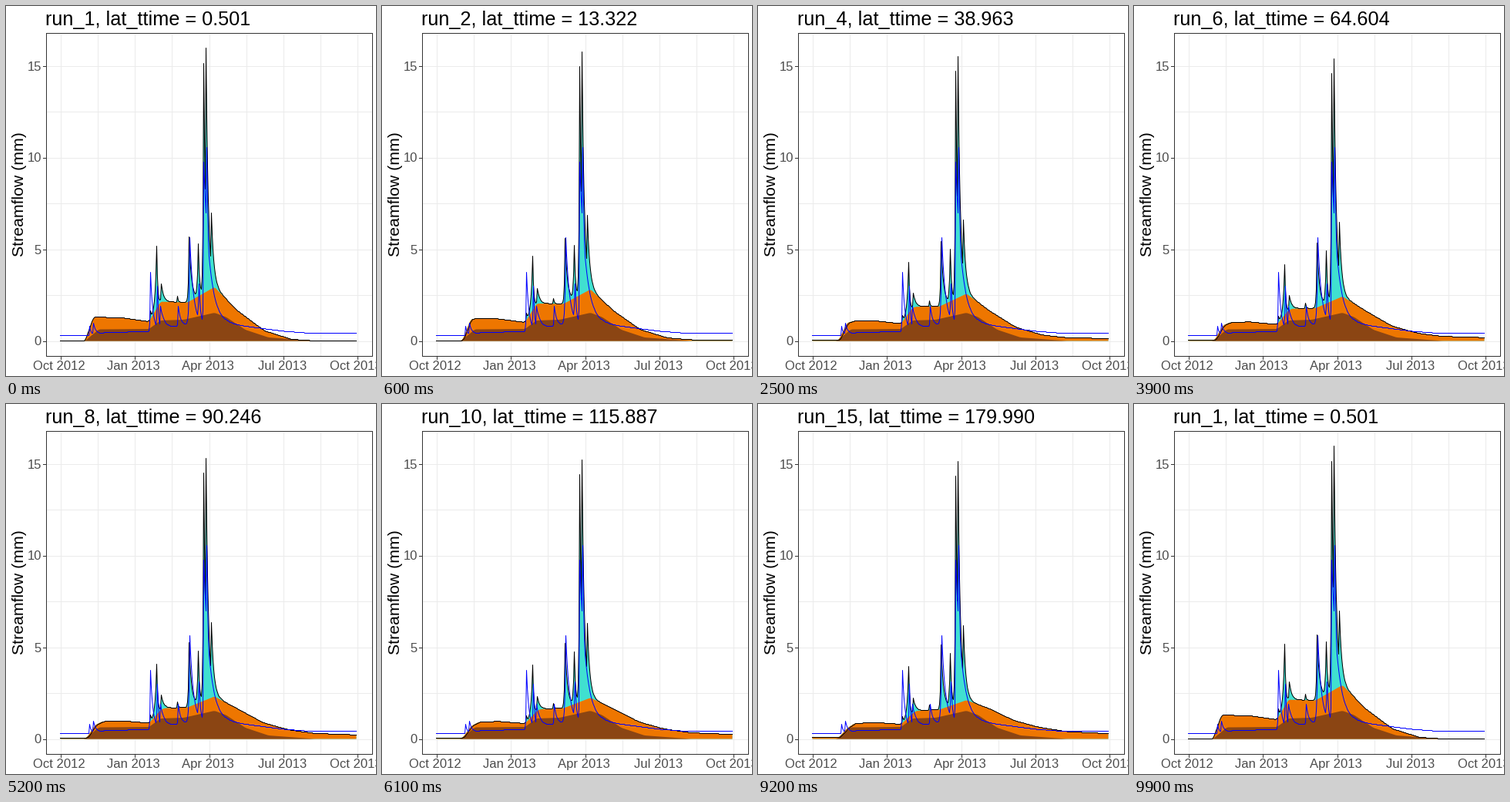
These frames come from a looping animation (480x480 px, 10 s). A matplotlib script:

```python
import numpy as np
import matplotlib.pyplot as plt
from matplotlib.animation import FuncAnimation

SIZE, DPI = 480, 100
PX = 72 / DPI
ZERO, UNIT = 434.5, 23.83          # pixel row of zero, pixels per mm
LEFT, RIGHT, TOP, BOTTOM = 51.5, 474.5, 34.5, 453.5
GRID, DARK, GREY = "#EBEBEB", "#333333", "#4D4D4D"
RUNS = 15
LAT_TIMES = np.linspace(0.501, 179.99, RUNS)
HOLDS = [7] * 6 + [6] + [7] * 3 + [6] * 4
STARTS = np.cumsum([4] + HOLDS)    # frame at which each change begins

plt.rcParams["font.family"] = "Liberation Sans"
plt.rcParams["path.simplify"] = False

X = np.arange(70, 455)

# Key points (x, height), both in pixels
BASE = [(102, 0), (120, 15), (185, 15.5), (200, 26.5), (230, 27.5), (270, 36.5),
        (285, 31), (310, 14.5), (340, 4.5), (400, 0)]
FAST = [(102, 0), (113, 31), (150, 30), (185, 25), (200, 51), (235, 50),
        (270, 70), (300, 39), (335, 13), (370, 2), (400, 0)]
SLOW = [(102, 2), (122, 18), (150, 20), (185, 18), (205, 34), (235, 36),
        (270, 47), (300, 39), (330, 26), (360, 18), (400, 11), (454, 8)]
OBSERVED = [(70, 7.5), (106, 6.5), (130, 11), (185, 12), (240, 22),
            (286, 22), (360, 12.5), (400, 9.5)]

# Storms: x, peak in mm, rise and fall in pixels
QUICK_STORMS = [(187, .35, .5, 1.5), (195, 2.75, 1.8, 1.3), (201, .8, .6, 3),
                (222, .3, .4, 1), (237, 3.5, .8, 3), (249, 2.85, 1.2, 1.5),
                (256, 12.4, .8, 2.5), (259, 13.15, .8, 3), (266, 4.1, 1, 3)]
SEEN_STORMS = [(108, .5, .3, 2), (113, .65, .5, 3), (187, 3.2, .5, 3),
               (196, 2.4, .8, 1.5), (200, 1.25, .5, 5), (223, 1.1, .4, 3),
               (238, 4.7, 1, 4.5), (250, 2.2, 1.2, 1.8), (256, 8.8, .4, 8),
               (260, 9.6, .6, 2.7), (266, 2.5, .5, 8)]


def smooth(points, x=X, width=5):
    """Key points joined by lines, with the corners rounded off."""
    offsets = np.arange(width) - width // 2
    return np.mean([np.interp(x + d, *zip(*points)) for d in offsets], axis=0)


def storms(events):
    """Highest of several peaks with exponential rise and recession."""
    pulses = [peak * np.exp(-np.where(X < x, (x - X) / rise, (X - x) / fall))
              for x, peak, rise, fall in events]
    return UNIT * np.max(pulses, axis=0)


def run_curves(lat):
    """Heights of base, lateral top, area top and simulated line."""
    weight = np.exp(-lat / 90)
    lag = 4 * (1 - np.exp(-lat / 8)) * np.clip((145 - X) / 20, 0, 1)

    def lateral(x):
        return weight * smooth(FAST, x) + (1 - weight) * smooth(SLOW, x)

    quick = storms(QUICK_STORMS) * (1 + np.where(X < 210, .25, .01) * np.exp(-lat / 10))
    top = lateral(X - lag / 2)
    base = np.minimum(smooth(BASE), top)
    return np.array([base, top, top + quick, lateral(X - lag) + quick])


CURVES = [run_curves(lat) for lat in LAT_TIMES]

fig = plt.figure(figsize=(SIZE / DPI, SIZE / DPI), dpi=DPI, facecolor="white")
ax = fig.add_axes([0, 0, 1, 1])
ax.set(xlim=(0, SIZE), ylim=(SIZE, 0))
ax.axis("off")


def stroke(xs, ys, color, z, snap=True):
    return ax.plot(xs, ys, color=color, lw=PX, snap=snap, zorder=z)[0]


def label(x, y, text, size, color="black", **kw):
    return ax.text(x, y, text, fontsize=size * PX, color=color, va="baseline", **kw)


def rows(heights):
    """Pixel-centred rows, which keep flat stretches crisp."""
    return np.floor(ZERO - heights) + .5


for i, month in enumerate(("Oct 2012", "Jan 2013", "Apr 2013", "Jul 2013", "Oct 2013")):
    x = round(70.4 + 96.1 * i) + .5
    stroke([x, x], [TOP, BOTTOM], GRID, 1)
    stroke([x, x], [BOTTOM, BOTTOM + 4], DARK, 6)
    label(x - 1.3, 472, month, 16.6, GREY, ha="center")
    if i < 4:
        stroke([x + 48, x + 48], [TOP, BOTTOM], GRID, 1)
for value in np.arange(0, 15.1, 2.5):
    y = rows(value * UNIT)
    stroke([LEFT, RIGHT], [y, y], GRID, 1)
    if value % 5 == 0:
        stroke([LEFT - 4, LEFT], [y, y], DARK, 6)
        label(46, y + 6, f"{value:.0f}", 16.6, GREY, ha="right")
stroke([LEFT, RIGHT, RIGHT, LEFT, LEFT], [TOP, TOP, BOTTOM, BOTTOM, TOP], DARK, 6)
label(23, 244, "Streamflow (mm)", 21.33, rotation=90, ha="center",
      rotation_mode="anchor")
title = label(51, 25, "", 25.25, ha="left")

areas = [ax.fill([0, 0, 0], [0, 0, 0], color=color, lw=0, zorder=z)[0]
         for z, color in ((4, "#8B4513"), (3, "#EE7600"), (2, "#40E0D0"))]
simulated = stroke(X + .5, X, "black", 5, snap=False)
stroke(X + .5, rows(smooth(OBSERVED) + storms(SEEN_STORMS)), "blue", 5.5, snap=False)


def state_at(frame):
    """Index of the run left, the run entered, and progress between them."""
    i = np.searchsorted(STARTS, frame, side="right") - 1
    if i < 0:
        return 0, 0, 1
    return i, (i + 1) % RUNS, min((frame - STARTS[i] + 1) / 3, 1)


def update(frame):
    before, after, t = state_at(frame)
    curves = (1 - t) * CURVES[before] + t * CURVES[after]
    for area, height in zip(areas, curves):
        area.set_xy(np.column_stack([np.r_[X, X[-1], X[0]] + .5,
                                     ZERO - np.r_[height, 0, 0]]))
    simulated.set_ydata(rows(curves[3]))
    run = after if t > .5 else before
    title.set_text(f"run_{run + 1}, lat_ttime = {LAT_TIMES[run]:.3f}")
    return [*areas, simulated, title]


anim = FuncAnimation(fig, update, frames=100, interval=100, repeat=True, repeat_delay=0)
plt.show()
```
